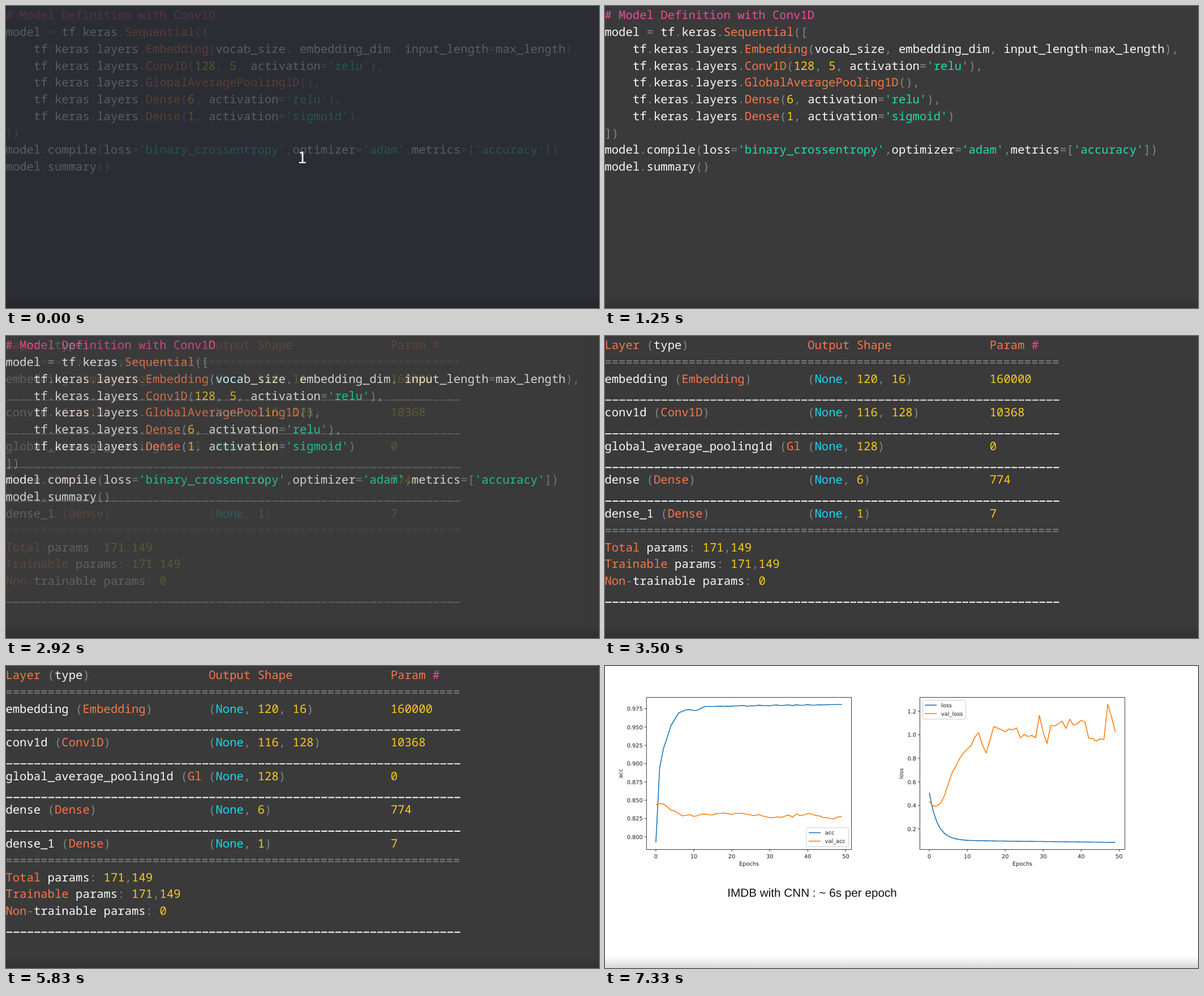
These frames come from a looping animation (1048 px wide and 534 px high, 8260 ms). An HTML page:

```html
<!DOCTYPE html>
<html lang="en">
<head>
<meta charset="utf-8">
<title>Conv1D model and training curves</title>
<style>
  html, body { margin: 0; width: 100%; height: 100%; overflow: hidden; background: #3a3a3a; }
  svg { display: block; width: 100vw; height: 100vh; }
  text { white-space: pre; text-rendering: geometricPrecision; }
  .mono { font: 500 20.6px "Roboto Mono", "Noto Sans Mono", monospace; }
  .plot { font: 9.8px "DejaVu Sans", sans-serif; fill: #1a1a1a; }
  .caption { font: 20.7px "Liberation Sans", Arial, sans-serif; fill: #111; }
  .count { font: 29px "Noto Sans CJK JP", "Noto Sans", sans-serif; fill: #fff; text-anchor: middle; }
</style>
</head>
<body>
<svg viewBox="0 0 1048 534" preserveAspectRatio="none">
  <defs>
    <linearGradient id="shade" x2="0" y2="1">
      <stop stop-opacity="0"/><stop offset="1" stop-opacity=".16"/>
    </linearGradient>
  </defs>
  <g id="code"></g>
  <g id="table"></g>
  <g id="charts"></g>
  <g id="intro">
    <rect width="1048" height="534" fill="#262932" opacity=".75"/>
    <text class="count" x="523.5" y="278">1</text>
  </g>
  <rect y="513" width="1048" height="21" fill="url(#shade)"/>
</svg>
<script>
const LOOP = 8260, ADVANCE = 12.37, LEADING = 29.78;
const $ = id => document.getElementById(id);
const background = color => `<rect width="1048" height="534" fill="${color}"/>`;

// ---- Highlighted listings ----
const codeText = `# Model Definition with Conv1D
model = tf.keras.Sequential([
    tf.keras.layers.Embedding(vocab_size, embedding_dim, input_length=max_length),
    tf.keras.layers.Conv1D(128, 5, activation='relu'),
    tf.keras.layers.GlobalAveragePooling1D(),
    tf.keras.layers.Dense(6, activation='relu'),
    tf.keras.layers.Dense(1, activation='sigmoid')
])
model.compile(loss='binary_crossentropy',optimizer='adam',metrics=['accuracy'])
model.summary()`;

const row = (layer, shape, params) => layer.padEnd(29) + shape.padEnd(26) + params;
const double = '='.repeat(65), single = '_'.repeat(65);
const tableText = [
  row('Layer (type)', 'Output Shape', 'Param #'), double,
  row('embedding (Embedding)', '(None, 120, 16)', '160000'), single,
  row('conv1d (Conv1D)', '(None, 116, 128)', '10368'), single,
  row('global_average_pooling1d (Gl', '(None, 128)', '0'), single,
  row('dense (Dense)', '(None, 6)', '774'), single,
  row('dense_1 (Dense)', '(None, 1)', '7'), double,
  'Total params: 171,149',
  'Trainable params: 171,149',
  'Non-trainable params: 0', single
].join('\n');

const rules = [
  [/^#/, '#ee4b9a'],
  [/^'/, '#22dca9'],
  [/^\d/, '#f8cc1d'],
  [/^None$/, '#12dcf2'],
  [/^[A-Z]/, '#f8774a'],
  [/^\w/, '#fafafa'],
  [/./, '#7c8a8f']
];
const colorOf = token => rules.find(([pattern]) => pattern.test(token))[1];

function listing(source) {
  return source.split('\n').map((line, i) => {
    const y = 23.2 + i * LEADING;
    if (line === single)
      return `<path d="M.7 ${y + 0.8}H803" stroke="#fafafa" stroke-width="1.9" stroke-dasharray="10.4 ${ADVANCE - 10.4}"/>`;
    const spans = [...line.matchAll(/#.*|'[^']*'|\w+|[^\w\s']+/g)].map(m =>
      `<tspan x="${m.index * ADVANCE - 0.6}" fill="${colorOf(m[0])}">${m[0]}</tspan>`);
    return `<text class="mono" y="${y}">${spans.join('')}</text>`;
  }).join('');
}

// ---- Charts; a series holds one stage height per epoch ----
const BLUE = '#1f77b4', ORANGE = '#ff7f0e', STEP = 6.71, EPOCHS = 50;

const perEpoch = f => Array.from({ length: EPOCHS }, (_, e) => f(e));

// Repeatable noise in -1..1
function noise(n) {
  const v = Math.sin(n * 127.1) * 43758.5;
  return 2 * (v - Math.floor(v)) - 1;
}

// Straight runs between [epoch, height] knots, roughened away from the knots
function rough(amount, knots) {
  return perEpoch(e => {
    const i = Math.max(1, knots.findIndex(([at]) => at >= e));
    const [e0, y0] = knots[i - 1], [e1, y1] = knots[i];
    const u = (e - e0) / (e1 - e0);
    return y0 + (y1 - y0) * u + amount * noise(e) * 4 * u * (1 - u);
  });
}

const acc = rough(1, [[0, 312], [1, 180], [2, 146], [4, 105], [6, 83], [8, 77.5], [11, 78], [13, 71.5], [49, 68]]);
const valAcc = rough(3, [[0, 245.5], [2, 244], [7, 265], [18, 260], [24, 262.5], [31, 268], [41, 261.5], [46, 270], [49, 266]]);
const loss = perEpoch(e => 308 + 0.08 * e - 84 * Math.exp(-0.48 * e));
const valLoss = rough(9, [[0, 239.5], [1, 248], [2, 247], [4, 229], [6, 189], [10, 147], [13, 118],
  [15, 154], [17, 107], [28, 127], [29, 87], [31, 137], [32, 105], [41, 99], [42, 128], [46, 130], [47, 67.5], [49, 117]]);

const label = (x, y, s, anchor = 'middle', extra = '') =>
  `<text class="plot" x="${x}" y="${y}" text-anchor="${anchor}" ${extra}>${s}</text>`;
const stroke = (d, color, width) =>
  `<path d="${d}" fill="none" stroke="${color}" stroke-width="${width}" stroke-linejoin="round"/>`;

function chart({ left, name, labelX, top, gap, max, step, count, digits, series, legend }) {
  const x0 = left + 16.6, right = left + 362.3, bottom = 324.5;
  let out = '', axes = `M${left} 55.5H${right}V${bottom}H${left}Z`;
  for (let e = 0; e <= EPOCHS; e += 10) {
    const x = x0 + e * STEP;
    axes += `M${x} ${bottom}v3.6`;
    out += label(x, 339.5, e);
  }
  for (let i = 0; i < count; i++) {
    const y = top + i * gap;
    axes += `M${left} ${y}h-3.6`;
    out += label(left - 6.5, y + 3.7, (max - i * step).toFixed(digits), 'end');
  }
  out += label((left + right) / 2, 353.3, 'Epochs');
  out += label(labelX, 190, name, 'middle', `transform="rotate(-90 ${labelX} 190)"`);
  series.forEach((ys, i) => {
    const d = 'M' + ys.map((y, e) => `${x0 + e * STEP} ${y}`).join('L');
    out += stroke(d, [BLUE, ORANGE][i], 1.6);
  });
  out += stroke(axes, '#222', 0.9);
  const [lx, ly, w] = legend;
  out += `<rect x="${lx}" y="${ly}" width="${w}" height="33.5" rx="2" fill="#fff" fill-opacity=".8" stroke="#ccc"/>`;
  [name, 'val_' + name].forEach((s, i) => {
    const y = ly + 8.7 + i * 15;
    out += stroke(`M${lx + 4} ${y}h21`, [BLUE, ORANGE][i], 1.6) + label(lx + 32.7, y + 3.5, s, 'start');
  });
  return out;
}

$('code').innerHTML = background('#3a3a3a') + listing(codeText);
$('table').innerHTML = background('#3a3a3a') + listing(tableText);
$('charts').innerHTML = background('#fff') +
  chart({
    left: 73.3, name: 'acc', labelX: 31, top: 75.5, gap: 32.36,
    max: 0.975, step: 0.025, count: 8, digits: 3,
    series: [acc, valAcc], legend: [356, 286, 74.5]
  }) +
  chart({
    left: 556.5, name: 'loss', labelX: 527, top: 80, gap: 41.6,
    max: 1.2, step: 0.2, count: 6, digits: 1,
    series: [loss, valLoss], legend: [561.3, 60.5, 76.5]
  }) +
  '<text class="caption" x="216.3" y="408">IMDB with CNN : ~ 6s per epoch</text>';

// ---- Timeline ----
const show = (id, on) => $(id).style.display = on ? '' : 'none';

function draw(now) {
  const t = now % LOOP;
  const fade = Math.min(1, Math.max(0, Math.floor((t - 2830) / 83) / 5));
  show('intro', t < 80);
  show('table', fade > 0);
  $('table').setAttribute('opacity', fade);
  show('charts', t >= 6500);
}

let start;
function tick(now) {
  start ??= now;
  draw(now - start);
  requestAnimationFrame(tick);
}
draw(0);
requestAnimationFrame(tick);
</script>
</body>
</html>
```
